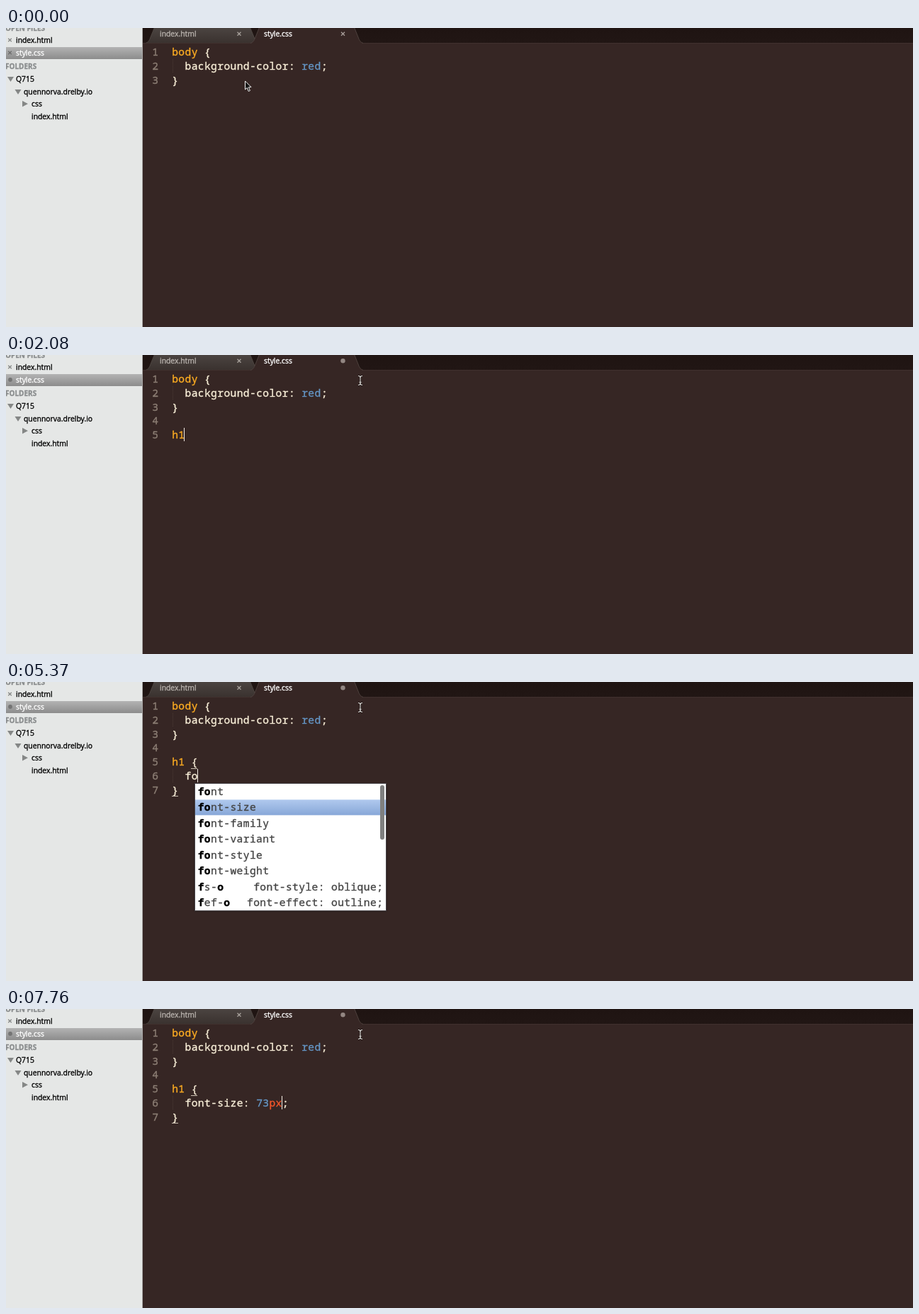
Write an HTML page with a canvas that moves like this. It is 1280 px wide and 423 px high and loops after 8000 ms.

```html
<!DOCTYPE html>
<html lang="en">
<head>
<meta charset="utf-8">
<title>Stylesheet editing</title>
<style>
  html, body { margin: 0; width: 100%; height: 100%; overflow: hidden; background: #362624; }
  canvas { display: block; }
</style>
</head>
<body>
<canvas id="stage" width="1280" height="423"></canvas>
<script>
const ctx = document.getElementById('stage').getContext('2d');
const LOOP = 8000, LEFT = 234, ADVANCE = 9.15, PITCH = 19.75, ROW = 22.45;
const MONO = '14.6px "Noto Sans Mono", monospace';
const UI = '10.4px "Open Sans", "Noto Sans", sans-serif';
const INK = '#faf0d9', BACK = '#362624';

const baseline = row => 39 + row * PITCH;
const column = col => LEFT + col * ADVANCE;

// Document states
const body = ['body {', '  background-color: red;', '}'];
const heading = text => [...body, '', text];
const rule = text => [...body, '', 'h1 {', '  ' + text, '}'];
const inner = [[4, 3], [6, 0]];

// Completion lists: [trigger, description, shift]
const fonts = ['font', 'font-size', 'font-family', 'font-variant', 'font-style', 'font-weight'].map(f => [f]);
const hList = [['h', 'height'], ['height'], ['h-a', 'height: auto;'], ['v-h', 'visibility: hidden;'],
  ['ov-h', 'overflow: hidden;'], ['ovx-h', 'overflow-x: hidden;'], ['ovy-h', 'overflow-y: hidden;'],
  ['bfv-h', 'backface-visibi…hidden;', -2]];
const foList = [...fonts, ['fs-o', 'font-style: oblique;'], ['fef-o', 'font-effect: outline;']];

const typing = (query, items, selected = 0, scroll = false) => ({
  lines: rule(query), caret: [5, 2 + query.length],
  popup: { query, items, selected, scroll, x: 266, y: 143 }
});
const value = (text, col) => ({ lines: rule(text), caret: [5, col], popup: null });

// Each step changes part of the state at its time
const steps = [
  [0, { lines: body, caret: null, match: [], popup: null, pointer: [337, 74, true] }],
  [150, { pointer: [342, 81] }],
  [450, { caret: [2, 1], match: [[0, 5], [2, 0]], pointer: [342, 80] }],
  [750, { pointer: [482, 40] }],
  [900, { caret: null, pointer: [500, 36] }],
  [1190, { lines: [...body, ''], caret: [3, 0], match: [] }],
  [1490, { lines: heading(''), caret: [4, 0] }],
  [1930, { lines: heading('h'), caret: [4, 1],
    popup: { query: 'h', items: hList, selected: 0, x: 247, y: 123 } }],
  [2080, { lines: heading('h1'), caret: [4, 2], popup: null }],
  [2530, { lines: heading('h1 '), caret: [4, 3] }],
  [2830, { lines: heading('h1 {}'), caret: [4, 4], match: [[4, 3], [4, 4]] }],
  [3280, { lines: rule(''), caret: [5, 2], match: inner }],
  [3880, { caret: null }],
  [4480, { caret: [5, 2] }],
  [4920, { caret: null }],
  [5370, typing('fo', foList, 1, true)],
  [5520, typing('fon', fonts, 1)],
  [5670, typing('font', fonts, 1)],
  [5820, typing('font-', fonts.slice(1))],
  [5970, typing('font-s', [['font-size'], ['font-style']])],
  [6120, typing('font-si', [['font-size']])],
  [6410, typing('font-siz', [['font-size']])],
  [6560, value('font-size:;', 12)],
  [6860, value('font-size: ;', 13)],
  [7160, value('font-size: 7;', 14)],
  [7460, value('font-size: 73;', 15)],
  [7760, value('font-size: 73px;', 17)]
];

function rect(x, y, w, h, fill) {
  ctx.fillStyle = fill;
  ctx.fillRect(x, y, w, h);
}

function gradient(y0, y1, from, to) {
  const g = ctx.createLinearGradient(0, y0, 0, y1);
  g.addColorStop(0, from);
  g.addColorStop(1, to);
  return g;
}

// Text with a hairline outline, for slightly heavier smoothing
function ink(text, x, y, colour) {
  ctx.fillStyle = ctx.strokeStyle = colour;
  ctx.lineWidth = 0.35;
  ctx.lineJoin = 'round';
  ctx.fillText(text, x, y);
  ctx.strokeText(text, x, y);
}

function label(text, x, y, colour, font = UI) {
  ctx.font = font;
  ctx.textAlign = 'left';
  ink(text, x, y, colour);
}

// Monospaced text on a fixed grid; isBold and colour are given per character
function mono(text, x, y, colourOf, isBold = () => false) {
  ctx.textAlign = 'center';
  [...text].forEach((ch, i) => {
    ctx.font = (isBold(i) ? 'bold ' : '') + MONO;
    ink(ch, x + (i + 0.5) * ADVANCE, y, colourOf(i));
  });
}

function shape(points, fill) {
  ctx.beginPath();
  points.forEach(([x, y]) => ctx.lineTo(x, y));
  ctx.closePath();
  ctx.fillStyle = fill;
  ctx.fill();
}

function cross(x, y, r, colour) {
  ctx.beginPath();
  ctx.moveTo(x - r, y - r); ctx.lineTo(x + r, y + r);
  ctx.moveTo(x + r, y - r); ctx.lineTo(x - r, y + r);
  ctx.strokeStyle = colour;
  ctx.lineWidth = 1.3;
  ctx.stroke();
}

function dot(x, y, r, colour) {
  ctx.beginPath();
  ctx.arc(x, y, r, 0, 7);
  ctx.fillStyle = colour;
  ctx.fill();
}

function sidebar(dirty) {
  const header = '#8a8d8e', text = '#000', grey = '#858786';
  const bold = 'bold 10px "Open Sans", "Noto Sans", sans-serif';
  rect(0, 0, 192, 423, '#e5e7e6');
  rect(192, 0, 1, 423, '#a9a7a6');
  label('OPEN FILES', -1, 4, header, bold);
  label('FOLDERS', -1, 57.5, header, bold);
  rect(0, 27, 192, 17, gradient(27, 44, '#b3b3b3', '#8c8c8c'));
  cross(5.5, 17, 2.3, grey);
  label('index.html', 14, 21, text);
  if (dirty) dot(6, 35, 2.9, '#747474');
  else cross(5.5, 35, 2.3, '#6c6c6c');
  label('style.css', 14, 39, '#fff');
  shape([[2, 69], [11, 69], [6.5, 76]], grey);
  label('Q715', 14, 76, text);
  shape([[12.5, 87], [21.5, 87], [17, 94]], grey);
  label('quennorva.drelby.io', 25, 93.5, text);
  shape([[23, 103], [31, 107.3], [23, 111.5]], grey);
  label('css', 36, 111, text);
  label('index.html', 36, 129, text);
}

function tab(l, r, fill, edge) {
  ctx.beginPath();
  ctx.moveTo(l, 21.5);
  ctx.quadraticCurveTo(l + 5, 20, l + 7, 13);
  ctx.lineTo(l + 13, -2);
  ctx.lineTo(r - 13, -2);
  ctx.lineTo(r - 7, 13);
  ctx.quadraticCurveTo(r - 5, 20, r, 21.5);
  ctx.fillStyle = fill;
  ctx.fill();
  ctx.strokeStyle = edge;
  ctx.lineWidth = 1;
  ctx.stroke();
}

function tabs(dirty) {
  rect(193, 0, 1087, 21, gradient(0, 21, '#1f1412', '#211614'));
  tab(197, 357, gradient(0, 21, '#4b4441', '#3a322f'), '#4d4541');
  rect(193, 21, 1087, 1, '#40312e');
  tab(345, 504, BACK, '#4d403d');
  rect(347, 21, 155, 2, BACK);
  label('index.html', 217, 12, '#b9b3ae');
  cross(329, 8.3, 2.5, '#aaa39e');
  label('style.css', 364, 12, '#fff');
  if (dirty) dot(475.5, 8.3, 3.2, '#938783');
  else cross(475.5, 8.3, 2.5, '#aaa09c');
}

function codeLine(text, row) {
  const colours = [];
  for (const m of text.matchAll(/^(body|h1)|red|\d+|(px)/g)) {
    const colour = m[1] ? '#fcac22' : m[2] ? '#f4562a' : '#6596c6';
    for (let i = 0; i < m[0].length; i++) colours[m.index + i] = colour;
  }
  const y = baseline(row);
  mono(String(row + 1), 206, y, () => '#8d7f75');
  if (text.startsWith('  '))
    for (let dy = 0; dy < 19; dy += 2) rect(235, Math.round(y - 15) + dy, 1, 1, '#4a3a35');
  mono(text, LEFT, y, i => colours[i] || INK);
}

function drawPopup({ query, items, selected, scroll, x, y }) {
  const height = items.length * ROW + 1.5;
  ctx.save();
  ctx.shadowColor = 'rgba(0,0,0,.35)';
  ctx.shadowBlur = 3;
  ctx.shadowOffsetY = 1;
  rect(x, y, 271, height, '#49454a');
  ctx.restore();
  rect(x + 1, y + 1, 269, height - 2, '#fff');
  items.forEach(([name, hint = '', shift = 0], i) => {
    const top = y + 1 + i * ROW, base = top + 16;
    if (i === selected) rect(x + 1, top, 269, ROW - 0.5, gradient(top, top + ROW, '#b0c9ee', '#86a6d7'));
    let found = 0;
    const hits = [...name].map(ch => ch === query[found] && ++found);
    mono(name, x + 4.5, base, c => hits[c] ? '#000' : '#444', c => hits[c]);
    mono(hint, x + 266 + shift - hint.length * ADVANCE, base, () => '#444');
  });
  if (scroll) {
    ctx.beginPath();
    ctx.roundRect(x + 262, y + 3, 6, 77, 3);
    ctx.fillStyle = '#7f7f7f';
    ctx.fill();
  }
}

function drawPointer([x, y, arrow]) {
  ctx.lineJoin = 'round';
  if (arrow) {
    ctx.beginPath();
    [[0.5, 1], [0.5, 13], [3.3, 10.5], [5.2, 15.5], [7.4, 14.6], [5.4, 9.8], [9, 9.6]]
      .forEach(([dx, dy]) => ctx.lineTo(x + dx, y + dy));
    ctx.closePath();
    ctx.fillStyle = '#111';
    ctx.fill();
    ctx.strokeStyle = '#f4f4f4';
    ctx.lineWidth = 1;
    ctx.stroke();
    return;
  }
  for (const [colour, width] of [['#17100f', 2.4], ['#e9e5e2', 1.1]]) {
    ctx.beginPath();
    for (const s of [-1, 1]) {
      ctx.moveTo(x - 3, y + s * 6.5);
      ctx.quadraticCurveTo(x, y + s * 6.5, x, y + s * 4);
      ctx.quadraticCurveTo(x, y + s * 6.5, x + 3, y + s * 6.5);
    }
    ctx.moveTo(x, y - 5);
    ctx.lineTo(x, y + 5);
    ctx.moveTo(x - 1.5, y + 2.5);
    ctx.lineTo(x + 1.5, y + 2.5);
    ctx.strokeStyle = colour;
    ctx.lineWidth = width;
    ctx.stroke();
  }
}

function draw(time) {
  const state = Object.assign({}, ...steps.filter(([at]) => at <= time).map(([, change]) => change));
  const dirty = state.lines.length > body.length;
  rect(0, 0, 1280, 423, BACK);
  tabs(dirty);
  sidebar(dirty);
  state.lines.forEach(codeLine);
  for (const [row, col] of state.match)
    rect(Math.round(column(col)), Math.floor(baseline(row) + 4), 9, 1, '#c9beb0');
  if (state.caret) {
    const [row, col] = state.caret;
    rect(Math.round(column(col) - 1), Math.round(baseline(row) - 15), 1, 19, '#f2ece4');
  }
  if (state.popup) drawPopup(state.popup);
  drawPointer(state.pointer);
}

const start = performance.now();
function tick() {
  draw((performance.now() - start) % LOOP);
  requestAnimationFrame(tick);
}
tick();
</script>
</body>
</html>
```
